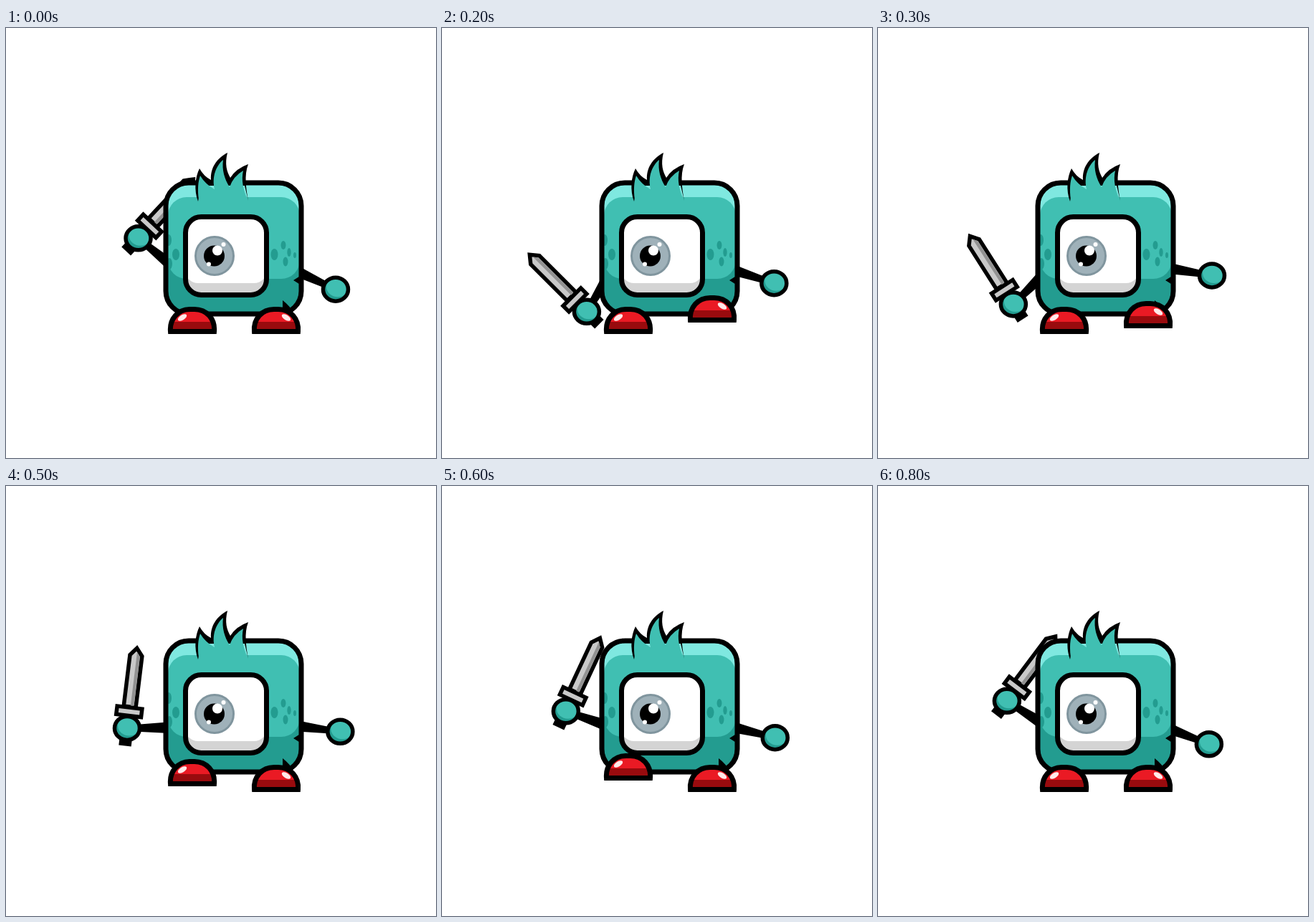
Animation of 600x600 px, one loop 900 ms. Source, as an HTML page:

```html
<!DOCTYPE html>
<html lang="en">
<head>
<meta charset="utf-8">
<title>Sword swing</title>
<style>
  html, body { margin: 0; width: 100%; height: 100%; overflow: hidden; background: #fff; }
  svg { display: block; width: 100%; height: 100%; }
  .mid { fill: #40bfb2; }
  .dark { fill: #239c90; }
  .line { fill: none; stroke: #000; stroke-width: 7; }
</style>
</head>
<body>
<svg viewBox="0 0 600 600">
  <defs>
    <rect id="body" x="223" y="216" width="189" height="183" rx="32"/>
    <rect id="eye" x="250.500" y="263.500" width="113" height="109" rx="22"/>
    <path id="shoe" d="M229.500 423.500H290.500C292 406 280 392.500 263 392.500H257C240 392.500 228 406 229.500 423.500Z"/>
    <clipPath id="bodyClip"><use href="#body"/></clipPath>
    <clipPath id="eyeClip"><use href="#eye"/></clipPath>
    <clipPath id="shoeClip"><use href="#shoe"/></clipPath>
    <clipPath id="handClip"><ellipse rx="17.500" ry="16.500"/></clipPath>
    <path id="arm" d="M0 -8.500L70 -4V4L0 8.500Z"/>
    <g id="hand">
      <ellipse class="dark" rx="17.500" ry="16.500"/>
      <ellipse class="mid" cx="3" cy="-4" rx="16" ry="14.500" clip-path="url(#handClip)"/>
      <ellipse rx="17.500" ry="16.500" fill="none" stroke="#000" stroke-width="5.500"/>
    </g>
    <g id="foot">
      <use href="#shoe" fill="#ea1a24"/>
      <rect x="225" y="410" width="70" height="14" fill="#990b0e" clip-path="url(#shoeClip)"/>
      <ellipse rx="7" ry="3.500" transform="translate(246 404) rotate(-32)" fill="#ffe9e9"/>
      <use href="#shoe" class="line"/>
    </g>
  </defs>

  <use id="swordArm" href="#arm"/>
  <use id="freeArm" href="#arm"/>
  <g id="sword" stroke="#000" stroke-width="5.500">
    <path d="M-6 0H6V22H-6Z"/>
    <path d="M-8.500 -30V-102L0 -112.500L8.500 -102V-30Z" fill="#c9c9c9"/>
    <path d="M1 -30V-107L5.500 -101V-30Z" fill="#929292" stroke="none"/>
    <path d="M-17.500 -29H17.500V-17.500H-17.500Z" fill="#c9c9c9"/>
  </g>
  <use id="swordHand" href="#hand"/>
  <use id="freeHand" href="#hand"/>

  <g clip-path="url(#bodyClip)">
    <use href="#body" class="dark"/>
    <rect x="223" y="216" width="189" height="70" fill="#7fe8e0"/>
    <rect class="mid" x="226" y="236" width="184" height="114" rx="26"/>
    <g class="dark">
      <ellipse cx="387" cy="303" rx="3.500" ry="6"/>
      <ellipse cx="374.500" cy="316" rx="5" ry="8"/>
      <ellipse cx="395" cy="313" rx="2.700" ry="6"/>
      <ellipse cx="390" cy="326" rx="3.500" ry="6.500"/>
      <ellipse cx="403" cy="317" rx="2" ry="4"/>
      <ellipse cx="227" cy="296" rx="4" ry="8"/>
      <ellipse cx="237" cy="316" rx="5" ry="8"/>
      <ellipse cx="228" cy="329" rx="4" ry="8"/>
    </g>
    <path d="M412 345L401 352L412 359ZM386 380V400H402Q398 389 386 380Z"/>
  </g>
  <use href="#body" class="line"/>

  <path d="M268 242C262 226 264 208 270 196Q276 207 286 212C285 195 294 182 309 174C305 190 308 200 313 209Q321 196 338 190C332 206 335 224 338 241L333 220H272Z"/>
  <path class="mid" d="M269 239C267 226 268 214 271 206Q278 218 291 225C287 208 293 192 303 184C301 198 305 211 312 222Q317 207 331 199C328 212 331 226 337 239Z"/>

  <g clip-path="url(#eyeClip)">
    <use href="#eye" fill="#d4d4d4"/>
    <rect x="250" y="250" width="114" height="106" rx="18" fill="#fff"/>
  </g>
  <use href="#eye" class="line"/>
  <circle cx="291" cy="318" r="26.500" fill="#9fb1b9" stroke="#80959e" stroke-width="3"/>
  <circle cx="290.500" cy="318" r="14.500"/>
  <g fill="#fff">
    <circle cx="295" cy="310.500" r="7"/>
    <circle cx="303.500" cy="302" r="3"/>
    <circle cx="283" cy="329.500" r="3"/>
  </g>

  <use id="leftFoot" href="#foot"/>
  <use id="rightFoot" href="#foot"/>
</svg>
<script>
const STEP = 100, STEPS = 9, LIFT = 16;
const swordShoulder = { x: 238, y: 337, reach: 69 };
const freeShoulder = { x: 392, y: 333, reach: 75 };
// Key points: step, angle in degrees.
const swordKeys = [[0, 43], [2, -45], [4, -20], [5, 7], [6, 25], [9, 43]];
const freeKeys = [[0, 25], [2, 18], [4, 1], [6, 14], [9, 25]];

function between(keys, step) {
  const next = keys.findIndex(([at]) => at > step);
  const [t0, a0] = keys[next - 1], [t1, a1] = keys[next];
  return a0 + (a1 - a0) * (step - t0) / (t1 - t0);
}

const place = (id, transform) => document.getElementById(id).setAttribute("transform", transform);

// Turns an arm about its shoulder and returns the position of its hand.
function pose(name, { x, y, reach }, angle) {
  const rad = angle * Math.PI / 180;
  const hand = `translate(${x + reach * Math.cos(rad)} ${y + reach * Math.sin(rad)})`;
  place(name + "Arm", `translate(${x} ${y}) rotate(${angle})`);
  place(name + "Hand", hand);
  return hand;
}

function draw(now) {
  const step = Math.floor(now / STEP) % STEPS;
  const swing = between(swordKeys, step);
  const hand = pose("sword", swordShoulder, 171.5 + 1.11 * swing);
  place("sword", `${hand} rotate(${swing})`);
  pose("free", freeShoulder, between(freeKeys, step));

  // The feet take turns, each rising for half of an eight-step walk.
  const walk = Math.sin(step * Math.PI / 4);
  const rise = LIFT * walk * walk;
  place("leftFoot", `translate(0 ${walk < 0 ? -rise : 0})`);
  place("rightFoot", `translate(637 ${walk > 0 ? -rise : 0}) scale(-1 1)`);
}

function tick() {
  draw(performance.now());
  requestAnimationFrame(tick);
}
tick();
</script>
</body>
</html>
```
